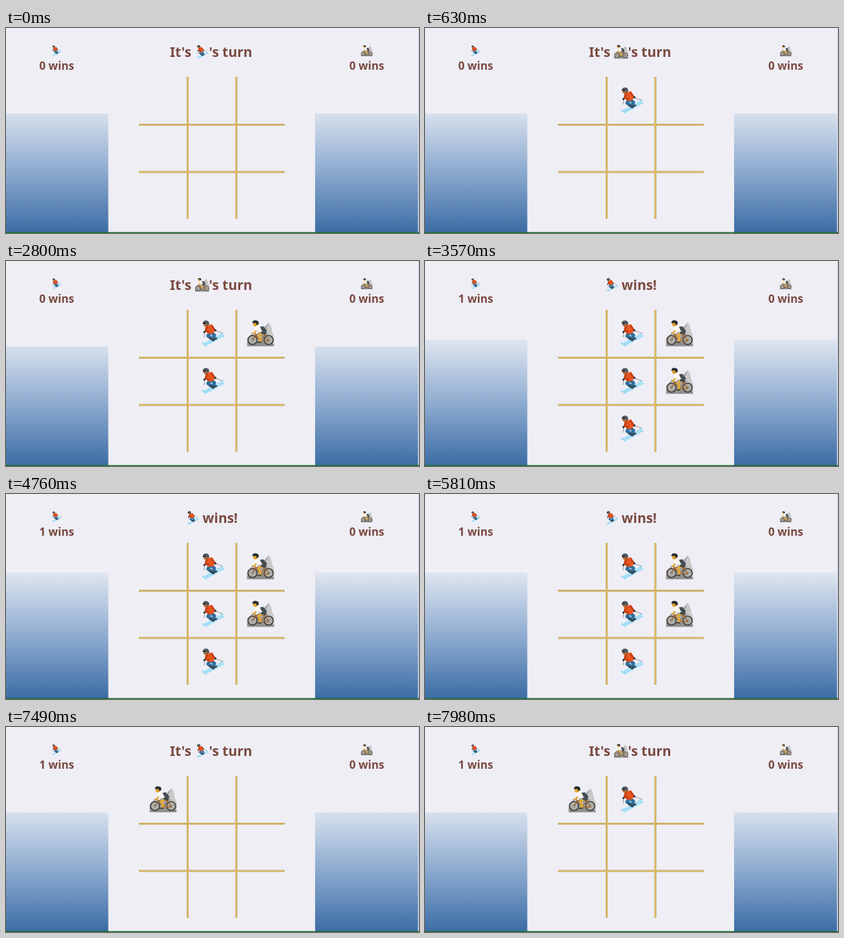
These frames come from a looping animation (640x319 px, 8 s). An HTML page:

```html
<!DOCTYPE html>
<html lang="en">
<head>
<meta charset="utf-8">
<title>Tic-tac-toe</title>
<style>
  html, body { margin: 0; width: 100%; height: 100%; overflow: hidden; background: #efeef5; }
  svg { display: block; }
  text { font-family: "Noto Sans", "Open Sans", sans-serif; font-weight: 700; fill: #79493f; }
  .title { font-size: 21px; }
  .score { font-size: 17.2px; }
</style>
</head>
<body>
<svg id="stage" width="640" height="319" viewBox="0 0 640 319">
  <defs>
    <linearGradient id="slope" gradientUnits="userSpaceOnUse" x1="0" y1="122" x2="0" y2="318">
      <stop offset="0" stop-color="#dfe5f0"/>
      <stop offset=".06" stop-color="#d6dfec"/>
      <stop offset=".5" stop-color="#8facd0"/>
      <stop offset="1" stop-color="#3c6da5"/>
    </linearGradient>

    <symbol id="skier" viewBox="0 0 42 42">
      <g fill="none" stroke-linecap="round" stroke-linejoin="round">
        <path d="M6 36.5 7 38 36 22M10 40 38 25" stroke="#8fd8f4" stroke-width="2.6"/>
        <path d="M7 37.2 35 22M12 39.7 37 26" stroke="#d4f1fb" stroke-width=".9"/>
        <path d="M9 18 8 27M24 16 37 21" stroke="#777d83" stroke-width=".8"/>
        <path d="M17 20 14 25 20 29M19 20 24 24 22 31" stroke="#2f6f9d" stroke-width="5.2"/>
        <path d="M17 29 22 31M22 31 27 29" stroke="#3b434a" stroke-width="2.8"/>
        <path d="M11 10 20 8 24 15 22 20 15 21 10 17Z" fill="#e8541f" stroke="#e8541f" stroke-width="2"/>
        <path d="M13 11 10 17 16 19M20 10 25 16" stroke="#bf3f17" stroke-width="2.4"/>
      </g>
      <circle cx="8.5" cy="19" r="1.7" fill="#343b42"/>
      <circle cx="25.5" cy="16.5" r="1.7" fill="#343b42"/>
      <circle cx="10.5" cy="7" r="3.5" fill="#a5683d"/>
      <path d="M6 6Q6 1 11 1 16 1 16 7L13 9 12 5Z" fill="#4d5860"/>
      <path d="M6 5.5H11" stroke="#252d34" stroke-width="2"/>
    </symbol>

    <symbol id="biker" viewBox="0 0 42 42">
      <path d="M0 41V29L7 22 13 24 23 15 29 9 34 4 37 10 39 19 42 26V41Z" fill="#a6a9aa"/>
      <path d="M34 4 29 16 33 22 29 31 42 38V26L39 19 37 10Z" fill="#c9cac8"/>
      <path d="M7 22 4 32 0 35V41H42V38L27 34 14 35 11 27Z" fill="#8d8f8e"/>
      <g fill="none" stroke-linecap="round" stroke-linejoin="round">
        <g fill="#b7b6b0" stroke="#3d3935" stroke-width="1.7">
          <circle cx="8.5" cy="31.5" r="7"/><circle cx="33.5" cy="31.5" r="7"/>
        </g>
        <path d="M2 31H15M8.5 25V38M27 31H40M33.5 25V38M4 27 13 36M29 27 38 36M4 36 13 27M29 36 38 27" stroke="#77736e" stroke-width=".5"/>
        <path d="M8.5 31.5 13 23H28L21 33 13 23M21 33H33.5L28 23M11 20 13 23M8 21H12" stroke="#9b632e" stroke-width="1.5"/>
        <path d="M25 20 18 24 21 31 19 35" stroke="#e5ad37" stroke-width="3.2"/>
        <path d="M17 35H21" stroke="#34383a" stroke-width="2"/>
        <path d="M17 11 25 18" stroke="#f7f7f4" stroke-width="8"/>
        <path d="M15 13 13 19 10 21" stroke="#e2a831" stroke-width="2.4"/>
        <path d="M15 11 14 15" stroke="#fff" stroke-width="3.4"/>
        <path d="M23 20 28 21" stroke="#40474b" stroke-width="3.5"/>
      </g>
      <path d="M20 11 25 10 31 17 28 21 23 17Z" fill="#454d52"/>
      <circle cx="13" cy="6.5" r="3.8" fill="#e0a22e"/>
      <path d="M8 5Q9 0 14 1 19 1 18 7L15 8 14 5Z" fill="#262c30"/>
    </symbol>
  </defs>

  <rect width="640" height="319" fill="#efeef5"/>
  <g fill="url(#slope)">
    <path id="hills"/>
  </g>
  <path d="M639.5 0V319" stroke="#cbd1e8"/>
  <rect y="317.6" width="640" height="1.4" fill="#147027"/>

  <g fill="none">
    <path d="M281.5 76V297M357 76V297M206 150.5H432M206 224H432" stroke="#aaa080" stroke-width="3"/>
    <path d="M281.5 76V297M357 76V297M206 150.5H432M206 224H432" stroke="#dfb957" stroke-width="2.2"/>
  </g>

  <use href="#skier" x="69.5" y="26.5" width="17.5" height="17.5"/>
  <use href="#biker" x="550" y="26.5" width="18" height="18"/>
  <text id="leftScore" class="score" x="51.5" y="65"></text>
  <text class="score" x="532" y="65">0 wins</text>

  <g id="turn">
    <text class="title" x="254" y="45">It's</text>
    <text class="title" x="314.5" y="45">'s turn</text>
  </g>
  <text id="win" class="title" x="304.5" y="45">wins!</text>
  <use id="icon" y="26" width="22" height="22"/>
  <g id="board"></g>
</svg>

<script>
  const LOOP = 8000, RESET = 6300, WIN = 3500;
  // Each move: time, player, cell (0 to 8), time cleared.
  const moves = [
    [140, "skier", 1, RESET],
    [1050, "biker", 2, RESET],
    [1960, "skier", 4, RESET],
    [2870, "biker", 5, RESET],
    [WIN, "skier", 7, RESET],
    [7350, "biker", 0, LOOP],
    [7840, "skier", 1, LOOP]
  ];
  const $ = id => document.getElementById(id);
  const show = (el, on) => el.setAttribute("visibility", on ? "visible" : "hidden");

  const pieces = moves.map(([, who, cell]) => {
    const el = document.createElementNS("http://www.w3.org/2000/svg", "use");
    const set = (k, v) => el.setAttribute(k, v);
    set("href", "#" + who);
    set("x", (who === "skier" ? 299 : 298) + (cell % 3 - 1) * 75.5);
    set("y", 91.5 + Math.floor(cell / 3) * 74);
    set("width", 42);
    set("height", 42);
    $("board").append(el);
    return el;
  });

  function draw(t) {
    moves.forEach(([from, , , to], i) => show(pieces[i], t >= from && t < to));
    const last = moves.filter(m => t >= m[0]).pop();
    const won = t >= WIN && t < RESET;
    const player = won || !last || last[1] === "biker" ? "skier" : "biker";
    const top = t >= 2870 && t < 7350 ? 122 : 133;

    show($("turn"), !won);
    show($("win"), won);
    $("icon").setAttribute("href", "#" + player);
    $("icon").setAttribute("x", won ? 278.5 : 293);
    $("leftScore").textContent = (t >= WIN ? 1 : 0) + " wins";
    $("hills").setAttribute("d",
      `M0 ${top}H156Q158.5 ${top} 158.5 ${top + 3}V318H0ZM479 ${top}H638.5V318H479Z`);
  }

  const start = performance.now();
  function tick() {
    draw((performance.now() - start) % LOOP);
    requestAnimationFrame(tick);
  }
  tick();
</script>
</body>
</html>
```
